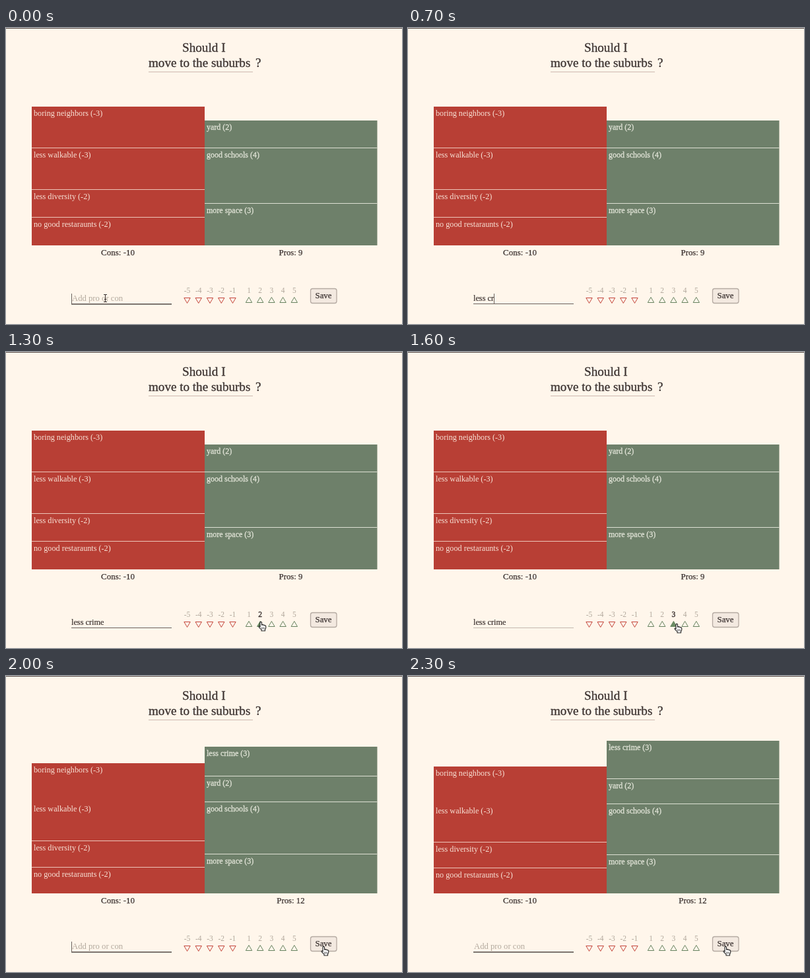
These frames come from a looping animation (600x448 px, 2400 ms). An HTML page with a canvas:

```html
<!DOCTYPE html>
<html lang="en">
<head>
<meta charset="utf-8">
<title>Pros and cons</title>
<style>
html, body { margin: 0; width: 100%; height: 100%; overflow: hidden; background: #fff6eb; }
canvas { display: block; }
</style>
</head>
<body>
<canvas id="stage" width="600" height="448"></canvas>
<script>
const ctx = document.getElementById("stage").getContext("2d");
const LOOP = 2400, STEP = 100, BASE = 329;
const INK = "#3b3230", MUTED = "#b3a99d", RED = "#b83f35", GREEN = "#6e806a";
const CONS = [["no good restaraunts", 2], ["less diversity", 2], ["less walkable", 3], ["boring neighbors", 3]];
const PROS = [["more space", 3], ["good schools", 4], ["yard", 2]];
const ENTRY = "less crime";
const HAND = new Path2D("M2 8V1.5Q3.2-.8 4.5 1.5V5Q5.8 4 6.7 5.4Q8 4.5 8.8 6Q10.4 5.4 10.7 7V9.5L9.5 12V14H4V12.2L.3 8.6Q-.6 6.9 1 7Z");

function rect(x, y, w, h, color) {
  ctx.fillStyle = color;
  ctx.fillRect(x, y, w, h);
}

function text(str, x, y, size, color = INK, align = "left", weight = 0) {
  ctx.font = `${size}px "Liberation Serif", Times, serif`;
  ctx.textAlign = align;
  ctx.fillStyle = ctx.strokeStyle = color;
  ctx.fillText(str, x, y);
  if (weight) {
    ctx.lineWidth = weight;
    ctx.strokeText(str, x, y);
  }
}

// Stacks items upwards from the base line.
function column(items, x, width, unit, { fill, color, line, size, sign, weight, skip }) {
  let y = BASE;
  const total = items.reduce((sum, item) => sum + (item[2] ?? item[1]), 0);
  const top = Math.round(BASE - total * unit);
  rect(x, top, width, BASE - top, fill);
  items.forEach(([name, value, shown = value], i) => {
    y -= shown * unit;
    const edge = Math.round(y);
    if (i < items.length - 1 && i !== skip) rect(x, edge - 1, width, 1, line);
    text(`${name} (${sign}${value})`, x + 3, edge + 13.7, size, color, "left", weight);
  });
}

function rating(value, active) {
  const up = value > 0;
  const x = up ? 368 + (value - 1) * 17.2 : 274.5 + (value + 5) * 17.25;
  text(value, x, 401, 11.5, active ? INK : MUTED, "center", active ? 0.4 : 0);
  const tip = up ? 407.5 : 416.5, base = up ? 415.5 : 408.5;
  ctx.beginPath();
  ctx.moveTo(x - 4.7, base);
  ctx.lineTo(x + 4.7, base);
  ctx.lineTo(x, tip);
  ctx.closePath();
  ctx.lineWidth = 1;
  ctx.strokeStyle = up ? "#66825f" : "#c4453b";
  ctx.stroke();
  if (active) {
    ctx.fillStyle = "#6b8c64";
    ctx.fill();
  }
}

function beam(x, y) {
  rect(x, y - 5, 1, 10, INK);
  for (const dy of [-6, 5]) rect(x - 2, y + dy, 5, 1, INK);
  rect(x - 1, y + 1, 3, 1, INK);
}

function hand(x, y) {
  ctx.save();
  ctx.translate(x - 3, y);
  ctx.fillStyle = "#fff";
  ctx.strokeStyle = "#222";
  ctx.lineWidth = 1.1;
  ctx.fill(HAND);
  ctx.stroke(HAND);
  ctx.beginPath();
  for (const gx of [4.6, 6.4, 8.2]) {
    ctx.moveTo(gx, 8.5);
    ctx.lineTo(gx, 11.5);
  }
  ctx.lineWidth = 0.7;
  ctx.stroke();
  ctx.restore();
}

function input(tick, saved) {
  const typed = saved ? "" : ENTRY.slice(0, tick);
  const blurred = tick >= 15 && !saved;
  if (typed) text(typed, 99, 413, 12.3, INK, "left", 0.2);
  else text("Add pro or con", 100, 413, 12.7, MUTED);
  rect(99, 417, 152, 1, blurred ? "#c3b8ae" : "#6a625e");
  if (!typed) rect(99, 418, 152, 1, "#8f8780");
  if (tick <= 10 || (saved && tick < 23)) {
    ctx.font = '12.3px "Liberation Serif", Times, serif';
    rect(Math.round(99 + ctx.measureText(typed).width), 402, 1, 15, "#6a625e");
  }
}

function pointer(tick) {
  if (tick === 0) beam(150, 409);
  else if (tick === 11) beam(216, 411);
  else if (tick >= 18) hand(481, 409);
  else if (tick >= 12) hand([367, 386, 405, 407, 407, 441][tick - 12], tick < 14 ? 408 : 411);
}

function draw(time) {
  const tick = Math.floor((time % LOOP) / STEP);
  const saved = tick >= 20;
  const grow = 1 - (1 - Math.min(1, Math.max(0, (tick - 19) * STEP / 260))) ** 3;
  const unit = 21 - 1.75 * grow;

  rect(0, 0, 600, 448, "#fff6eb");
  rect(0, 0, 600, 1, "#5b504d");
  text("Should I", 267, 35.6, 19.2, INK, "left", 0.3);
  text("move to the suburbs", 216, 59.4, 19.1, INK, "left", 0.3);
  text("?", 378, 59.4, 19.1, INK, "left", 0.3);
  rect(216, 66, 158, 1, "#cdb9b0");

  column(CONS, 39, 262, unit, {
    fill: RED, color: "#f8e3d7", line: "#edc4b8", size: 12.2, sign: "-", skip: saved ? 2 : -1
  });
  column(saved ? [...PROS, [ENTRY, 3, 3 * grow]] : PROS, 301, 261.5, unit, {
    fill: GREEN, color: "#e2e4d8", line: "#dde0d3", size: 12, sign: "", weight: 0.3
  });
  text("Cons: -10", 169.5, 344, 13, INK, "center", 0.25);
  text("Pros: " + (saved ? 12 : 9), 431.5, 344, 12.8, INK, "center", 0.25);

  input(tick, saved);
  const active = saved || tick < 12 ? 0 : Math.min(3, tick - 11);
  for (let v = -5; v <= 5; v++) if (v) rating(v, v === active);

  ctx.beginPath();
  ctx.roundRect(461.5, 394.5, 39.5, 22, 3);
  ctx.fillStyle = "#f3e9e0";
  ctx.fill();
  ctx.strokeStyle = "#b5aaa2";
  ctx.lineWidth = 1.3;
  ctx.stroke();
  text("Save", 481, 409.3, 12.8, INK, "center", 0.25);
  pointer(tick);
}

const start = performance.now();
function frame() {
  draw(performance.now() - start);
  requestAnimationFrame(frame);
}
frame();
</script>
</body>
</html>
```
